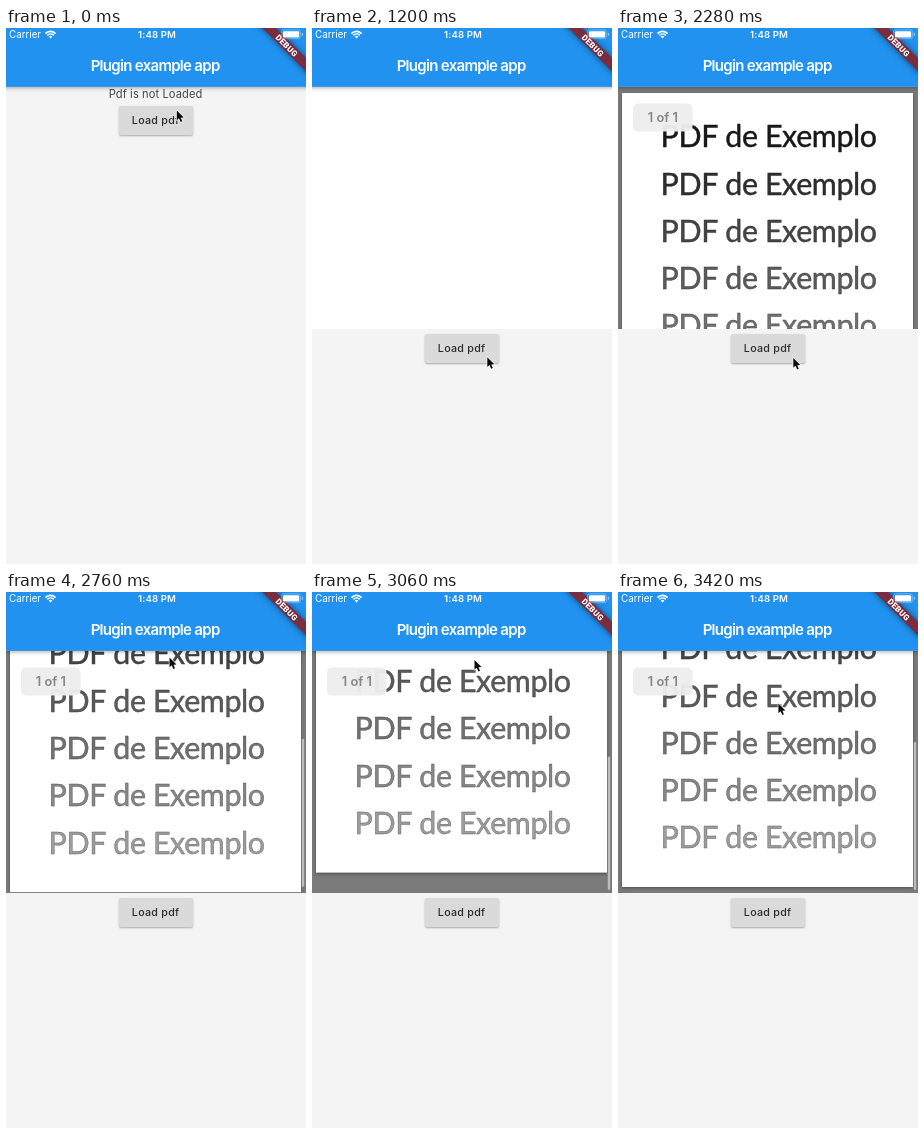
Animation of 300x536 px, one loop 3.48 s. Source, as an HTML page with a canvas:

```html
<!DOCTYPE html>
<html lang="en">
<head>
<meta charset="utf-8">
<title>Plugin example app</title>
<style>
  html, body { margin: 0; width: 100%; height: 100%; overflow: hidden; background: #f4f4f4; }
  canvas { display: block; width: 100vw; height: 100vh; }
</style>
</head>
<body>
<canvas id="stage"></canvas>
<script>
const W = 300, H = 536, LOOP = 3480, STEP = 60;
const BAR = 58.8, VIEW_END = 301;
const LOADED = 1140, PDF_SHOWN = 1680;
const PAGE = { x: 4, y: 65, w: 291, h: 376.6 };
const SCROLL_MAX = 146.6;

const canvas = document.getElementById('stage');
const ctx = canvas.getContext('2d');

// Keys: time, value(s)
const cursorKeys = [
  [0, 170.8, 82.5], [300, 170.8, 82.5], [600, 163, 148], [840, 162, 219], [960, 175.3, 329],
  [2280, 175.3, 330], [2460, 168, 205], [2760, 163.5, 65.5], [2940, 163.5, 66],
  [3060, 162.5, 68], [3180, 161.3, 80.5], [3420, 160.4, 111.5]
];
const scrollKeys = [
  [0, 0], [2460, 0], [2520, 26], [2640, 88], [2760, 141.4], [2820, 161], [2880, 172],
  [2940, 175.6], [3000, 170], [3060, 161], [3120, 154], [3180, 149.6], [3300, 147.4], [3420, SCROLL_MAX]
];

function sample(keys, t) {
  const n = keys.findIndex(k => k[0] > t);
  if (n < 0) return keys[keys.length - 1].slice(1);
  const a = keys[n - 1], b = keys[n];
  const p = (t - a[0]) / (b[0] - a[0]);
  return a.slice(1).map((v, i) => v + (b[i + 1] - v) * p);
}

function box(x, y, w, h, r, fill) {
  ctx.beginPath();
  ctx.roundRect(x, y, w, h, r);
  ctx.fillStyle = fill;
  ctx.fill();
}

function shadow(color, blur, dy) {
  const k = canvas.width / W;
  ctx.shadowColor = color;
  ctx.shadowBlur = blur * k;
  ctx.shadowOffsetY = dy * k;
}

function setType(font, align, spacing) {
  ctx.font = font;
  ctx.textAlign = align;
  ctx.letterSpacing = spacing + 'px';
}

function label(str, x, y, font, fill, align = 'center', spacing = 0) {
  setType(font, align, spacing);
  ctx.fillStyle = fill;
  ctx.fillText(str, x, y);
}

const gray = v => `rgb(${v},${v},${v})`;

function drawButton(y) {
  ctx.save();
  shadow('rgba(0,0,0,.3)', 2, 1);
  box(113, y, 74, 29, 2, '#dadada');
  ctx.restore();
  label('Load pdf', 149.6, y + 18, '500 10.7px Inter, sans-serif', '#2b2b2b', 'center', 0.27);
}

function drawPage(scroll, inkAlpha) {
  const top = PAGE.y - scroll;
  ctx.save();
  shadow('rgba(0,0,0,.35)', 3, 1);
  ctx.fillStyle = '#fff';
  ctx.fillRect(PAGE.x, top, PAGE.w, PAGE.h);
  ctx.restore();

  ctx.save();
  ctx.globalAlpha = inkAlpha;
  ctx.lineWidth = 0.4;
  ctx.lineJoin = 'round';
  for (let i = 0; i < 7; i++) {
    const y = top + 54.2 + i * 47.3;
    label('PDF de Exemplo', 42.6, y, '30.4px Lato, sans-serif', gray(24 + i * 22), 'left', -0.4);
    ctx.strokeStyle = gray(20 + i * 12);
    ctx.strokeText('PDF de Exemplo', 42.6, y);
  }
  ctx.restore();
}

function drawThumb(scroll) {
  const over = Math.max(0, scroll - SCROLL_MAX);
  const top = 61 + 89 * Math.min(1, scroll / SCROLL_MAX) + over;
  const bottom = Math.min(298, top + 148);
  box(295.8, top, 2.4, bottom - top, 1.2, '#bdbdbd');
}

function drawViewer(t) {
  const [scroll] = sample(scrollKeys, t);
  ctx.save();
  ctx.beginPath();
  ctx.rect(0, BAR, W, VIEW_END - BAR);
  ctx.clip();
  ctx.fillStyle = '#fff';
  ctx.fillRect(0, BAR, W, VIEW_END - BAR);
  if (t >= PDF_SHOWN) {
    const ink = Math.min(1, 0.4 + (t - PDF_SHOWN) / 300);
    ctx.fillStyle = '#7a7a7a';
    ctx.fillRect(0, BAR, W, VIEW_END - BAR);
    drawPage(scroll, ink);
    if (scroll > 0) drawThumb(scroll);
    box(15, 75.5, 59.5, 28, 5, 'rgba(238,238,238,.96)');
    label('1 of 1', 44.8, 94.3, '600 12.8px Inter, sans-serif', '#868686');
  }
  ctx.restore();
}

function drawStatus() {
  label('Carrier', 3, 10, '9.8px Inter, sans-serif', '#fff', 'left');
  label('1:48 PM', 151, 10, '600 9.6px Inter, sans-serif', '#fff', 'center', 0.1);
  // Wi-Fi fan
  ctx.strokeStyle = '#fff';
  ctx.lineWidth = 1.6;
  for (const r of [4.4, 7]) {
    ctx.beginPath();
    ctx.arc(44.5, 10.4, r, -Math.PI * 0.76, -Math.PI * 0.24);
    ctx.stroke();
  }
  ctx.beginPath();
  ctx.moveTo(44.5, 10.6);
  ctx.arc(44.5, 10.4, 2.6, -Math.PI * 0.76, -Math.PI * 0.24);
  ctx.fillStyle = '#fff';
  ctx.fill();
}

function drawBattery() {
  ctx.beginPath();
  ctx.roundRect(275.4, 1.9, 19.2, 8.8, 2.2);
  ctx.lineWidth = 0.8;
  ctx.strokeStyle = 'rgba(255,255,255,.4)';
  ctx.stroke();
  box(276.8, 3.2, 16.4, 6.2, 1.2, '#fff');
  box(295.8, 4.8, 1.2, 3, 0.6, 'rgba(255,255,255,.5)');
}

function drawBanner() {
  ctx.save();
  ctx.translate(W, -1.7);
  ctx.rotate(Math.PI / 4);
  ctx.save();
  shadow('rgba(0,0,0,.5)', 6.3, 0);
  ctx.fillStyle = 'rgb(121,45,63)';
  ctx.fillRect(-40, 22.4, 80, 9.6);
  ctx.restore();
  label('DEBUG', 0, 30.2, '900 8.2px Roboto, sans-serif', '#fff', 'center', 0.2);
  ctx.restore();
}

function drawAppBar() {
  ctx.save();
  shadow('rgba(0,0,0,.32)', 4, 1.2);
  ctx.fillStyle = '#2192ef';
  ctx.fillRect(-10, -10, W + 20, BAR + 10);
  ctx.restore();
  label('Plugin example app', 149.1, 42.5, '600 15px Inter, sans-serif', '#fff', 'center', -0.7);
  drawStatus();
  drawBanner();
  drawBattery();
}

function drawCursor(x, y) {
  const pts = [[0, 0], [0, 9.8], [2.2, 7.8], [3.9, 11.5], [5.5, 10.7], [4, 7.2], [7, 7]];
  ctx.beginPath();
  pts.forEach(([dx, dy]) => ctx.lineTo(x + dx, y + dy));
  ctx.closePath();
  ctx.lineJoin = 'round';
  ctx.lineWidth = 1.4;
  ctx.strokeStyle = 'rgba(255,255,255,.9)';
  ctx.stroke();
  ctx.fillStyle = '#0a0a0a';
  ctx.fill();
}

function draw(t) {
  ctx.fillStyle = '#f4f4f4';
  ctx.fillRect(0, 0, W, H);
  if (t < LOADED) {
    label('Pdf is not Loaded', 149.5, 70, '11.1px Inter, sans-serif', '#454545', 'center', 0.1);
    drawButton(78);
  } else {
    drawViewer(t);
    drawButton(306);
  }
  drawAppBar();
  drawCursor(...sample(cursorKeys, t));
}

function resize() {
  const k = window.devicePixelRatio || 1;
  canvas.width = Math.round(innerWidth * k);
  canvas.height = Math.round(innerHeight * k);
}

function frame() {
  const t = performance.now() % LOOP;
  ctx.setTransform(canvas.width / W, 0, 0, canvas.height / H, 0, 0);
  draw(Math.floor(t / STEP) * STEP);
  requestAnimationFrame(frame);
}

addEventListener('resize', resize);
resize();
frame();
</script>
</body>
</html>
```
